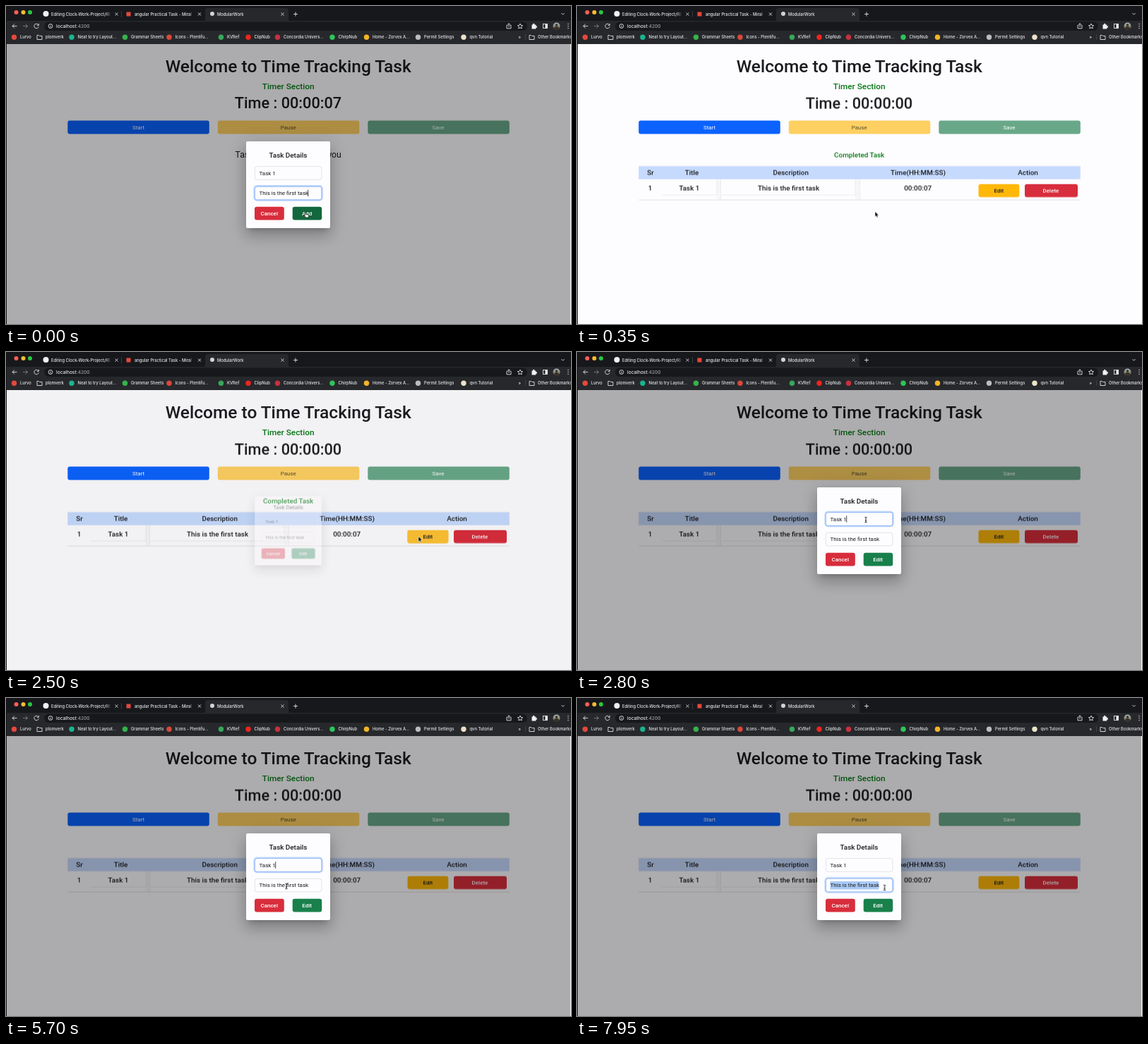
An HTML page for the animation above (8000 ms loop, 800 by 451 pixels).

```html
<!DOCTYPE html>
<html lang="en">
<head>
<meta charset="utf-8">
<title>Time tracking demo</title>
<style>
html, body { margin: 0; width: 100%; height: 100%; overflow: hidden; background: #fdfcfe; }
#stage { position: relative; width: 800px; height: 451px; overflow: hidden; }
#stage > * { position: absolute; }
svg { display: block; left: 0; top: 0; overflow: hidden; }

text { font: 500 9.9px Roboto, sans-serif; fill: #1b1c20; }
.mid { text-anchor: middle; }
.ui { font: 500 5.8px Inter, sans-serif; fill: #e6e8eb; }
.url { font-size: 6.6px; }
.btn { font-size: 8px; }
.plain { font-weight: 400; font-size: 8px; }
.green { fill: #067a16; }
.white { fill: #fff; }
.line { fill: none; stroke: #e2e4e7; stroke-width: .9; }

#backdrop { left: 1px; top: 54px; right: 1px; bottom: 0; background: rgba(0, 0, 0, .32); animation: backdrop 8s infinite; }
#dialog {
  left: 340px; top: 192px; width: 119px; height: 123px; border-radius: 2px; background: #fdfcfe;
  box-shadow: 0 5.5px 7.5px -3.5px rgba(0,0,0,.2), 0 12px 19px 1.5px rgba(0,0,0,.14), 0 4.5px 23px 4px rgba(0,0,0,.12);
  animation: dialog 8s infinite;
}
.field { fill: #fdfcfe; stroke: #ced4da; stroke-width: .6; }
.ring { fill: none; stroke: #0d6efd; stroke-opacity: .25; stroke-width: 2.2; }
.edge { fill: none; stroke: #86b7fe; stroke-width: .7; }
.caret { stroke: #111; stroke-width: .8; }

.step { animation: 8s step-end infinite; }
.empty { animation-name: untilAdded; }
.filled { animation-name: afterAdded; }
.adding { animation-name: adding; }
.editing { animation-name: editing; }
.hover { animation-name: hover; }
.first { animation-name: firstField; }
.second { animation-name: secondField; }
.briefly { animation-name: briefCaret; }
.selected { animation-name: selected; }
.blink { animation: blink 1s -.365s step-end infinite; }

@keyframes untilAdded { 0% { opacity: 1 } 1.3125%, 100% { opacity: 0 } }
@keyframes afterAdded { 0% { opacity: 0 } 1.3125%, 100% { opacity: 1 } }
@keyframes adding { 0% { opacity: 1 } 12.5%, 100% { opacity: 0 } }
@keyframes editing { 0% { opacity: 0 } 12.5%, 100% { opacity: 1 } }
@keyframes hover { 0% { opacity: 0 } 22.5% { opacity: 1 } 31.875%, 100% { opacity: 0 } }
@keyframes firstField { 0% { opacity: 0 } 32.9375% { opacity: 1 } 82.5%, 100% { opacity: 0 } }
@keyframes secondField { 0% { opacity: 0 } 82.5%, 100% { opacity: 1 } }
@keyframes briefCaret { 0% { opacity: 0 } 82.5% { opacity: 1 } 88.75%, 100% { opacity: 0 } }
@keyframes selected { 0% { opacity: 0 } 92.5%, 100% { opacity: 1 } }
@keyframes blink { 0% { opacity: 1 } 50%, 100% { opacity: 0 } }

@keyframes backdrop {
  0%, .375% { opacity: 1; animation-timing-function: cubic-bezier(.25, .8, .25, 1) }
  5.375% { opacity: 0; animation-timing-function: step-end }
  31.0625% { opacity: 0; animation-timing-function: cubic-bezier(.25, .8, .25, 1) }
  36.0625%, 100% { opacity: 1 }
}
@keyframes dialog {
  0%, .375% { opacity: 1; transform: scale(1); animation-timing-function: linear }
  1.3125% { opacity: 0; transform: scale(1); animation-timing-function: step-end }
  31.0625% { opacity: 0; transform: scale(.7); animation-timing-function: cubic-bezier(0, 0, .2, 1) }
  32.9375%, 100% { opacity: 1; transform: scale(1) }
}

#pointer { left: 0; top: 0; animation: travel 8s ease-in-out infinite; }
#pointer svg { position: absolute; left: -8px; top: -8px; }
.hand { animation-name: hand; }
.arrow { animation-name: arrow; }
.beam { animation-name: beam; }
@keyframes travel {
  0%, 10% { transform: translate(422px, 291.5px); animation-timing-function: ease-in }
  14% { transform: translate(470px, 340px); animation-timing-function: linear }
  17% { transform: translate(520px, 330px); animation-timing-function: ease-out }
  22.5%, 31.2% { transform: translate(584px, 261.5px) }
  34.5%, 38% { transform: translate(409px, 238px) }
  44%, 62% { transform: translate(384px, 238px) }
  68%, 72% { transform: translate(397px, 267px) }
  80%, 100% { transform: translate(435.5px, 269px) }
}
@keyframes hand { 0% { opacity: 1 } 1.3125% { opacity: 0 } 22.5% { opacity: 1 } 31.0625%, 100% { opacity: 0 } }
@keyframes arrow { 0% { opacity: 0 } 1.3125% { opacity: 1 } 22.5% { opacity: 0 } 31.0625% { opacity: 1 } 33.75%, 100% { opacity: 0 } }
@keyframes beam { 0% { opacity: 0 } 33.75%, 100% { opacity: 1 } }
</style>
</head>
<body>
<div id="stage">
  <svg width="800" height="451">
    <defs>
      <linearGradient id="tabFade"><stop stop-color="#17181c" stop-opacity="0"/><stop offset="1" stop-color="#17181c"/></linearGradient>
      <linearGradient id="portrait" x2="0" y2="1"><stop stop-color="#a8b7ba"/><stop offset="1" stop-color="#6d5a32"/></linearGradient>
      <clipPath id="tabClipA"><path d="M60 0h89v22H60z"/></clipPath>
      <clipPath id="tabClipB"><path d="M180 0h88v22H180z"/></clipPath>
    </defs>
    <rect width="800" height="451" fill="#131519"/>
    <rect x="1" y="1" width="799" height="20" fill="#17181c"/>
    <rect x="1" y="21" width="799" height="33" fill="#27282c"/>
    <rect x="1" y="54" width="799" height="397" fill="#fdfcfe"/>

    <g id="tabs">
      <circle cx="14.5" cy="9" r="3" fill="#fe5f57"/>
      <circle cx="24.5" cy="9" r="3" fill="#febc2e"/>
      <circle cx="34" cy="9" r="3" fill="#28c840"/>
      <path d="M279 21.5q3 0 3-3V7q0-4 4-4h110q4 0 4 4v11.5q0 3 3 3z" fill="#27282c"/>
      <circle cx="56.5" cy="11" r="4" fill="#f1f2f3"/>
      <rect x="170.5" y="8.5" width="6" height="6" fill="#e5483c"/>
      <circle cx="292" cy="11" r="3" fill="#d3d5d8"/>
      <text class="ui" x="64" y="13.5" clip-path="url(#tabClipA)">Editing Clock-Work-Project/README</text>
      <text class="ui" x="182" y="13.5" clip-path="url(#tabClipB)">angular Practical Task - Miral</text>
      <text class="ui" x="299" y="13.5">ModularWork</text>
      <path d="M141 6h8v11h-8z" fill="url(#tabFade)"/>
      <path d="M260 6h8v11h-8z" fill="url(#tabFade)"/>
      <path class="line" d="M154.500 9.500l4 4m0-4l-4 4M272 9.500l4 4m0-4l-4 4M389.500 9.500l4 4m0-4l-4 4M407 11.500h6m-3-3v6"/>
      <path d="M163.500 7v9" stroke="#4a4b4f" stroke-width=".7"/>
      <path class="line" d="M786.500 10.200l2 2 2-2"/>
    </g>

    <g id="toolbar">
      <rect x="54" y="22.500" width="684" height="12.500" rx="6.250" fill="#17181c"/>
      <path class="line" d="M15.500 28.500h-6.500m3-3l-3 3 3 3M45.600 26.500a3.200 3.200 0 1 0 .6 2.800M46.300 25v2.400h-2.400"/>
      <path class="line" d="M24 28.500h6.500m-3-3l3 3-3 3" stroke-opacity=".45"/>
      <g class="line">
        <circle cx="63" cy="28.500" r="2.900"/>
        <path d="M63 28v2.200M63 26.600v.7"/>
        <path d="M710.500 27.200h-1.500v4.600h6v-4.600h-1.500M712 29.800v-5m-1.600 1.500l1.600-1.600 1.600 1.600"/>
        <path d="M728 25l1.100 2.400 2.500.3-1.900 1.700.5 2.500-2.200-1.200-2.200 1.200.5-2.500-1.900-1.700 2.500-.3z"/>
      </g>
      <path d="M744.500 26.500h1.600a1.200 1.200 0 1 1 2.200 0h2v1.900a1.200 1.200 0 1 1 0 2.200v1.900h-5.800z" fill="#f1f2f4"/>
      <rect class="line" x="760.500" y="25.500" width="6" height="6"/>
      <rect x="763.500" y="25.500" width="3" height="6" fill="#f1f2f4"/>
      <circle cx="779.500" cy="28.500" r="5" fill="url(#portrait)"/>
      <path d="M776 32a3.500 3 0 0 1 7 0 5 5 0 0 1-7 0z" fill="#34312c"/>
      <circle cx="779.500" cy="27" r="1.700" fill="#34312c"/>
      <path d="M796 25.500h.01M796 28.500h.01M796 31.500h.01" stroke="#e4e6e8" stroke-width="1.400" stroke-linecap="round"/>
      <text class="ui url" x="71" y="31">localhost<tspan fill="#9a9da2">:4200</tspan></text>
    </g>
    <g id="bookmarks"></g>

    <g id="page" transform="translate(0 -.4)">
      <text class="mid" x="399.700" y="94" style="font-size:24.500px">Welcome to Time Tracking Task</text>
      <text class="mid green" x="399.700" y="118" style="font-size:11.800px">Timer Section</text>
      <rect x="87.300" y="163" width="200.500" height="19" rx="3" fill="#0b62fd"/>
      <rect x="299.800" y="163" width="200.500" height="19" rx="3" fill="#fed061"/>
      <rect x="512.300" y="163" width="200.500" height="19" rx="3" fill="#68a889"/>
      <text class="mid plain white" x="187.500" y="175.400">Start</text>
      <text class="mid plain" x="399.700" y="175.400" fill-opacity=".72">Pause</text>
      <text class="mid plain white" x="612" y="175.400">Save</text>

      <g class="step empty">
        <text class="mid" x="399.500" y="145.500" style="font-size:21.700px">Time : 00:00:07</text>
        <text class="mid" x="399.700" y="215.500" style="font-size:12.200px;font-weight:400">Task is not available for you</text>
      </g>
      <g class="step filled">
        <text class="mid" x="399.500" y="145.500" style="font-size:21.700px">Time : 00:00:00</text>
        <text class="mid green" x="399.700" y="215">Completed Task</text>
        <rect x="87.300" y="227.500" width="625.500" height="18.500" fill="#c6dafe"/>
        <path d="M198 246h6v29h-6zM394 246h7v29h-7z" fill="#f6f6f8"/>
        <path d="M120 268.500h78V246M205 268.500h189V246M203.500 246v29M400.500 246v29" fill="none" stroke="#e9e9ec" stroke-width=".8"/>
        <path d="M87.500 275.500H713" stroke="#d9dce0" stroke-width=".8"/>
        <g id="cells"></g>
        <rect x="568.500" y="253" width="57.800" height="18.500" rx="3" fill="#ffb80a"/>
        <rect class="step hover" x="568.500" y="253" width="57.800" height="18.500" rx="3" fill="#ffc232"/>
        <rect x="634" y="253" width="75" height="18.500" rx="3" fill="#d82d3c"/>
        <text class="mid btn" x="597.300" y="265">Edit</text>
        <text class="mid btn white" x="671" y="265">Delete</text>
      </g>
    </g>
  </svg>

  <div id="backdrop"></div>
  <div id="dialog">
    <svg width="119" height="123" viewBox="340 192 119 123">
      <defs>
        <g id="focus">
          <rect class="ring" x="351.500" y="226.700" width="96.200" height="20.500" rx="4"/>
          <rect class="edge" x="352.300" y="227.500" width="94.600" height="18.900" rx="3"/>
        </g>
      </defs>
      <text class="mid" x="399.500" y="215.200">Task Details</text>
      <rect class="field" x="352.300" y="227.600" width="94.500" height="18.700" rx="3"/>
      <rect class="field" x="352.300" y="256.200" width="94.500" height="18.700" rx="3"/>
      <rect x="352" y="284.700" width="41.800" height="18.700" rx="3" fill="#d82d3c"/>
      <text class="mid btn white" x="372.700" y="296.700">Cancel</text>
      <g class="step adding">
        <use href="#focus" y="28.500"/>
        <path class="caret" d="M427.700 260.700v9.500"/>
        <rect x="405.700" y="284.700" width="41.500" height="18.700" rx="3" fill="#13673c"/>
        <text class="mid btn white" x="426.200" y="296.700">Add</text>
      </g>
      <g class="step editing">
        <g class="step first">
          <use href="#focus"/>
          <path class="caret blink" d="M381.700 232.200v9.500"/>
        </g>
        <use class="step second" href="#focus" y="28.500"/>
        <path class="caret step briefly" d="M427.700 260.700v9.500"/>
        <rect class="step selected" x="358.500" y="260" width="68.800" height="11.500" fill="#a9caf5"/>
        <rect x="405.700" y="284.700" width="41.500" height="18.700" rx="3" fill="#19804b"/>
        <text class="mid btn white" x="426.200" y="296.700">Edit</text>
      </g>
      <text class="plain" x="358.500" y="239.700">Task 1</text>
      <text class="plain" x="358.500" y="268.200">This is the first task</text>
    </svg>
  </div>

  <div id="pointer">
    <svg width="20" height="22" viewBox="-8 -8 20 22">
      <path class="step arrow" d="M0 0v7.500l1.700-1.600 1.200 2.700 1.300-.6-1.200-2.600h2.400z" fill="#000" stroke="#fff" stroke-width=".6"/>
      <path class="step hand" transform="translate(1.2 .6)" d="M-.3.8q.8-1 1.500 0l.5 2.700 2.800.5q1.200.3 1 1.500l-.6 2.500H1.400L-1.200 5q-.2-1 .9-.6l.6.4z" fill="#fff" stroke="#000" stroke-width=".7"/>
      <path class="step beam" d="M-1.500-3.800Q0-3.800 0-2.800Q0-3.800 1.500-3.800M0-2.800v5.600M-1.500 3.800Q0 3.800 0 2.800Q0 3.800 1.500 3.800M-.9 1.200h1.800" fill="none" stroke="#111" stroke-width=".9"/>
    </svg>
  </div>
</div>
<script>
const byId = id => document.getElementById(id);
const folder = x => `<path class="line" d="M${x - 3.5} 41.500h2.500l1 1h3.500v5h-7z"/>`;

// icon x, icon colour (none for a folder), label
const bookmarks = [
  [11.5, '#e5483c', 'Lurvo'], [47.5, '', 'plomverk'], [93, '#19b58f', 'Neat to try Layout...'],
  [168.5, '#35b34a', 'Grammar Sheets'], [231, '#d9483b', 'Icons - Plentifu...'], [304.5, '#37a85a', 'KVRef'],
  [343, '#f0251e', 'ClipNub'], [384.5, '#c8313e', 'Concordia Univers...'], [462, '#2dc45a', 'ChirpNub'],
  [510.5, '#f2b526', 'Home - Zorvex A...'], [583.5, '#b9bcc0', 'Permit Settings'], [648, '#ece2c8', 'qvn Tutorial'],
  [744.5, '', 'Other Bookmarks']
];
byId('bookmarks').innerHTML = bookmarks.map(([x, color, label]) =>
  (color ? `<circle cx="${x}" cy="44.300" r="3.700" fill="${color}"/>` : folder(x)) +
  `<text class="ui" x="${x + 8.5}" y="46.400">${label}</text>`
).join('') + '<text class="ui" x="725.500" y="46.400">»</text><path d="M735.500 40v8" stroke="#4a4b4f" stroke-width=".7"/>';

const cell = y => ([x, label]) => `<text class="mid" x="${x}" y="${y}">${label}</text>`;
byId('cells').innerHTML =
  [[104, 'Sr'], [162.5, 'Title'], [302.7, 'Description'], [483, 'Time(HH:MM:SS)'], [638.5, 'Action']].map(cell(240)).join('') +
  [[103.5, '1'], [159, 'Task 1'], [299.5, 'This is the first task'], [482.7, '00:00:07']].map(cell(261.5)).join('');
</script>
</body>
</html>
```
